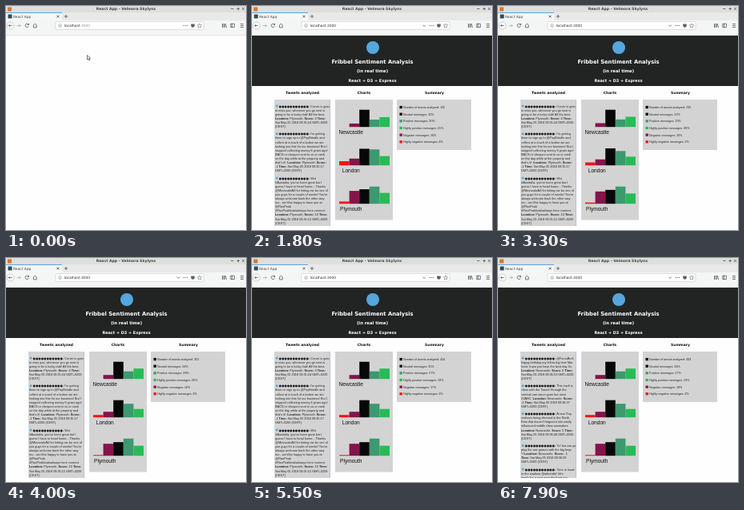
An HTML page that plays this animation: 300 by 280 pixels, repeating every 8000 ms.

```html
<!DOCTYPE html>
<html lang="en">
<head>
<meta charset="utf-8">
<title>React App</title>
<style>
html, body { margin: 0; width: 100%; height: 100%; overflow: hidden; background: #fefefe; }
svg { display: block; width: 100vw; height: 100vh; }
text { font-family: "Liberation Sans", Arial, sans-serif; white-space: pre; }
.ui { font-family: "DejaVu Sans", sans-serif; }
.b { font-weight: bold; }
.line { fill: none; stroke: #444; stroke-width: .7; }
</style>
</head>
<body>
<svg id="stage" viewBox="0 0 300 280">
  <g id="chrome"></g>
  <g id="page">
    <g id="frame"></g>
    <clipPath id="clip"><rect x="28" y="117" width="69" height="158"/></clipPath>
    <g id="tweets" clip-path="url(#clip)"></g>
    <g id="charts"></g>
    <g id="summary"></g>
  </g>
  <path id="cursor" d="M101.5 61.5v5.600l1.300-1.200 1 2.200 1-.5-1-2.100h1.700z" fill="#fff" stroke="#222" stroke-width=".6"/>
</svg>
<script>
const LOOP = 8000, STEP = 100, LOAD = 100;
const RED = '#f41414', MAROON = '#85144b', BLACK = '#080808', TEAL = '#3d9970', GREEN = '#28bb55';
const BAR_COLORS = [RED, MAROON, BLACK, TEAL, GREEN];
const el = id => document.getElementById(id);

const rect = (x, y, w, h, fill, extra = '') =>
  `<rect x="${x}" y="${y}" width="${w}" height="${h}" fill="${fill}" ${extra}/>`;
const text = (x, y, size, str, cls = '', fill = '#222', anchor = 'start') =>
  `<text x="${x}" y="${y}" font-size="${size}" class="${cls}" fill="${fill}" text-anchor="${anchor}">${str}</text>`;
const line = d => `<path class="line" d="${d}"/>`;

// Time in ms, tweet count, then shares of each mood in percent
const STATS = [
  [100, 0, 0, 0, 0, 0, 0],
  [1000, 86, 30, 29, 20, 15, 6],
  [2500, 160, 30, 31, 21, 16, 2],
  [4000, 301, 34, 28, 20, 16, 2],
  [5500, 424, 35, 27, 19, 17, 2],
  [6900, 457, 34, 27, 19, 18, 2],
  [7900, 493, 34, 27, 19, 18, 2]
];
const MOODS = [['Number of tweets analyzed', BLACK], ['Neutral messages', BLACK], ['Positive messages', TEAL],
  ['Highly positive messages', GREEN], ['Negative messages', MAROON], ['Highly negative messages', RED]];

// Bar heights soon after loading and once settled
const CITIES = [
  ['Newcastle', [0, 4, 21.5, 9, 12], [0, 5, 21.5, 9.5, 13]],
  ['London', [6, 9, 20.5, 21, 12], [3, 7, 21.5, 17, 10.5]],
  ['Plymouth', [3.5, 16.5, 18.5, 21.5, 14], [1, 15, 17, 21.5, 12.5]]
];

// Newest batch first; each tweet is a list of wrapped lines
const BATCHES = [
  [7400, `@FionaBrell
happy birthday my fellow big time Mia
lover, hope you have the best day Xx.
Location: Newcastle. Score: 8 Time:
Sat May 05 2018 09:36:53 GMT+0200
(CEST)

This track is
class with the Tweed 'through the
vertical cam weve gone but more
#VASC. Location: Newcastle. Score:
-2 Time: Sat May 05 2018 09:36:37
GMT+0200 (CEST)

A new Tory
endures being dressed in the North
East that doesn't fragment into easily
influenced middle class wannabes.
Location: Newcastle. Score: 5 Time:
Sat May 05 2018 09:36:40 GMT+0200
(CEST)

Yo! but can ya
play the war games with the big boys
? Location: Newcastle. Score: -1
Time: Sat May 05 2018 09:36:39
GMT+0200 (CEST)

Time to head
to the stadium @mbrindle! #it's
timely for a seat near the front row.`],
  [1800, `Corvin is going
to miss you, wherever you go next is
going to be a lucky club! All the best.
Location: Plymouth. Score: 4 Time:
Sat May 05 2018 09:35:24 GMT+0200
(CEST)

I'm getting
them to sign up to @PayBrindle and
collect at a touch of a button we are
looking into this for our business! But I
stopped collecting money 6 years ago!
BACS or cheques sent to us or cash
on the day while at the property and
that's it!. Location: Plymouth. Score:
-1 Time: Sat May 05 2018 09:35:17
GMT+0200 (CEST)

Wot
#Australia, you've been great but I
guess I have to head home... Thanks
@MossvaleAU for letting me be one of
you guys for a couple of weeks! You're
always welcome back the other way
too - we'd be happy to have you at
@FlaxPeak
#FlaxPeakleadsalways here connect
Location: Plymouth. Score: 10 Time:
Sat May 05 2018 09:35:15 GMT+0200
(CEST)`],
  [100, `Corby tinker
and the six surprise shoes. Location:
Plymouth. Score: -1 Time: Sat May 05
2018 09:34:50 GMT+0200 (CEST)

Morning
noodles with the team! #bento #keys
#not.a.cryptomonday Platform...
https://www.instagram.com
/p/BiPvZqPnAu/
?utm_source=share... Location:
Plymouth. Score: 1 Time: Sat May 05
2018 09:34:42 GMT+0200 (CEST)

Driving to the
game from Plymouth after 2 tickets can
anyone help please. Location:
Plymouth. Score: 3 Time: Sat May 05
2018 09:34:32 GMT+0200 (CEST)

on route to
Gillingham away. last away day of the
season let's make it a good one #away.
Location: Plymouth. Score: 3 Time:
Sat May 05 2018 09:34:23 GMT+0200
(CEST)

A brief
intermission in the holiday photos -
starting the circular coast cycle...
https://www.instagram.com`]
];

function drawChrome(loaded) {
  const arrow = (x, d) => line(`M${x - 2.2 * d} 24.5h${4.4 * d}m${-1.8 * d} -1.8l${1.8 * d} 1.8l${-1.8 * d} 1.8`);
  el('chrome').innerHTML =
    rect(0, 0, 300, 8, '#dededc') + rect(2, 1.5, 5, 5, '#d9772b') +
    text(150, 5.4, 4.6, 'React App - Velmora Skylynx', 'ui b', '#444', 'middle') +
    line('M281 3.5h3.5M288.5 3.5h3.5M290.25 1.8v3.5M295 2l3 3M298 2l-3 3') +
    rect(0, 8, 300, 10, '#e8e9e8') + rect(0, 8, 70, 10, '#f5f6f6') + rect(0, 8, 70, .9, '#4a9be0') +
    rect(2.5, 10.5, 5, 5, '#2c4c5d') + text(9, 14.7, 4.4, 'React App', 'ui', '#444') +
    line('M63.5 11.5l3 3M66.5 11.5l-3 3M72.8 13h4.4M75 10.8v4.4') +
    rect(0, 18, 300, 19, '#f4f5f5') + rect(0, 36.5, 300, .6, '#d8d8d8') +
    '<circle cx="5.5" cy="24.5" r="4.5" fill="#fff" stroke="#aaa" stroke-width=".6"/>' +
    arrow(5.5, -1) + `<g opacity=".45">${arrow(16, 1)}</g>` +
    line('M28 23a2.2 2.2 0 1 0 .3 2.2M28.5 21.8v1.8h-1.8') +
    line('M33.7 24.6l2.6-2.4 2.6 2.4M34.5 24.3v2.6h3.6v-2.6') +
    rect(62, 19.5, 185, 10, '#fff', 'stroke="#ccc" stroke-width=".6" rx="1"') +
    '<circle cx="67.5" cy="24.5" r="1.9" fill="none" stroke="#777" stroke-width=".5"/>' + rect(67.2, 24, .6, 1.5, '#777') +
    text(72.7, 26.1, 4.4, `localhost<tspan fill="${loaded ? '#333' : '#999'}">:3000</tspan>`, 'ui') +
    (loaded ? line('M213.5 23.8l1.7 1.6 1.7-1.6') : '') +
    [222, 224.2, 226.4].map(x => rect(x - .5, 24, 1, 1, '#555')).join('') +
    '<path d="M231.2 22.4h4.6v2a2.3 2.3 0 0 1-4.6 0z" fill="#666"/>' + line('M232.3 23.900l1.200 1.100 1.200-1.100') +
    '<path class="line" style="stroke-width:.45" d="M242 21.8l.8 1.800 1.900.2-1.400 1.300.4 1.900-1.700-1-1.700 1 .4-1.900-1.400-1.300 1.900-.2z"/>' +
    line('M270.5 22v5M272 22v5M273.3 22v5M274.3 22l1.3 5M280.8 22.2h4.6v4.400h-4.600zM282.5 22.2v4.400M293 22.5h4M293 24.5h4M293 26.5h4');
}

function drawFrame() {
  const heading = (x, str) => text(x, 109.7, 4.5, str, 'ui b', '#111', 'middle');
  const title = (y, size, str) => text(150.5, y, size, str, 'ui b', '#fff', 'middle');
  el('frame').innerHTML =
    rect(0, 37, 300, 243, '#fefefe') + rect(0, 37, 300, 63, '#222423') +
    '<circle cx="151" cy="52" r="8" fill="#55a6de"/>' +
    title(71.5, 6.75, 'Fribbel Sentiment Analysis') + title(82.7, 5.3, '(in real time)') +
    title(94.7, 4.95, 'React + D3 + Express') +
    heading(63, 'Tweets analyzed') + heading(140, 'Charts') + heading(228, 'Summary') +
    rect(28, 117, 70, 158, '#d3d3d3') + rect(97, 117, 1, 158, '#bfc1d0') +
    rect(104, 117, 72, 150.5, '#d3d3d3') + rect(181, 117, 93, 63, '#d3d3d3');
}

function drawTweets(t) {
  const tweets = BATCHES.filter(b => t >= b[0]).flatMap(b => b[1].split('\n\n'));
  const dots = `<tspan class="ui b" font-size="3.9">${'●'.repeat(11)}</tspan><tspan class="b">: </tspan>`;
  let y = 126.5, out = '';
  for (const tweet of tweets) {
    if (y > 282) break;
    out += `<circle cx="31" cy="${y - 1.6}" r="1.5" fill="#55a6de"/>`;
    tweet.split('\n').forEach((row, i) => {
      const str = row.replace(/(Location|Score|Time):/g, '<tspan class="b">$&</tspan>');
      out += i ? text(29, y, 3.85, str) : text(33.5, y, 3.85, dots + str);
      y += 5.1;
    });
    y += 4.2;
  }
  el('tweets').innerHTML = out;
}

function drawCharts(t) {
  const grow = Math.min(1, (t - LOAD) / 600), settle = Math.max(0, Math.min(1, (t - 1000) / 3000));
  el('charts').innerHTML = CITIES.map(([name, early, late], c) => {
    const base = 151.2 + 48 * c;
    return early.map((h, i) => {
      const height = grow * (h + (late[i] - h) * settle);
      return rect(109 + 12.6 * i, base - height, 12.6, height, BAR_COLORS[i]);
    }).join('') + text(123.8, base + 8.7, 6.6, name, '', '#111', 'middle');
  }).join('');
}

function drawSummary(t) {
  const next = Math.max(1, STATS.findIndex(s => s[0] >= t));
  const a = STATS[next - 1], b = STATS[next], k = (t - a[0]) / (b[0] - a[0]);
  el('summary').innerHTML = MOODS.map(([label, color], i) => {
    const y = 127.9 + 8.65 * i, value = Math.round(a[i + 1] + (b[i + 1] - a[i + 1]) * k);
    return rect(184.5, y - 3, 3.3, 3.3, color) + text(189, y, 3.65, `${label}: ${value}${i ? '%' : ''}`);
  }).join('');
}

let shown = -1;
function render(now) {
  const t = Math.floor(now % LOOP / STEP) * STEP;
  if (t !== shown) {
    shown = t;
    const loaded = t >= LOAD;
    drawChrome(loaded);
    el('page').style.display = loaded ? '' : 'none';
    el('cursor').style.display = loaded ? 'none' : '';
    if (loaded) [drawTweets, drawCharts, drawSummary].forEach(draw => draw(t));
  }
  requestAnimationFrame(() => render(performance.now() - start));
}

drawFrame();
const start = performance.now();
render(0);
</script>
</body>
</html>
```
